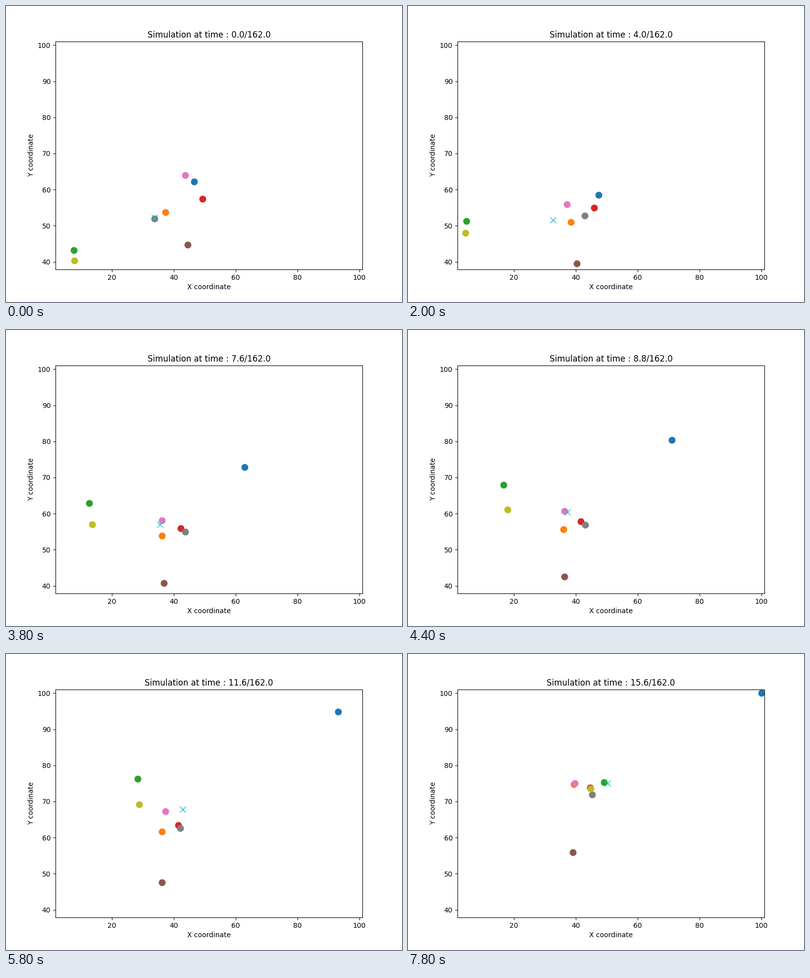
Animation, 800 px wide and 600 px high, one loop 8000 ms. Source, as a matplotlib script:

```python
import numpy as np
import matplotlib.pyplot as plt
from matplotlib.animation import FuncAnimation

FRAMES, INTERVAL, STEP, TOTAL = 40, 200, 0.4, 162.0
LIMIT = 100  # agents stop at the edge of the world

# Each agent steers smoothly through a few waypoints at these times.
TIMES = np.array([0, 2, 5.6, 11.6, 15.6])
AGENTS = {
    "C0": [(46.6, 62.2), (44.6, 56.8), (52.7, 63.2), (93.2, 94.8), (130.9, 100.5)],
    "C1": [(37.3, 53.8), (39.5, 51.4), (37.1, 51.8), (36.3, 61.7), (39.4, 74.8)],
    "C2": [(7.7, 43.2), (3.8, 46.7), (7.5, 55.6), (28.4, 76.3), (49.2, 75.3)],
    "C3": [(49.4, 57.4), (48.5, 56.4), (43.9, 54.4), (41.5, 63.4), (44.7, 73.8)],
    "C5": [(44.6, 44.7), (43.0, 41.3), (38.4, 39.2), (36.3, 47.6), (39.1, 55.9)],
    "C6": [(43.8, 64.0), (39.1, 58.4), (36.6, 55.8), (37.3, 67.2), (39.8, 75.1)],
    "C7": [(33.8, 51.9), (40.1, 53.2), (43.9, 52.8), (42.2, 62.6), (45.3, 71.9)],
    "C8": [(7.9, 40.3), (2.8, 44.6), (8.1, 51.1), (28.8, 69.2), (44.8, 73.5)],
}
points = np.array(list(AGENTS.values())).swapaxes(0, 1)
speeds = np.gradient(points, TIMES, axis=0, edge_order=2)


def positions(t):
    """Positions of all agents: cubic Hermite between waypoints."""
    k = min(np.searchsorted(TIMES, t, side="right"), len(TIMES) - 1) - 1
    span = TIMES[k + 1] - TIMES[k]
    u = (t - TIMES[k]) / span
    ease = u * u * (3 - 2 * u)
    pos = points[k] + ease * (points[k + 1] - points[k])
    pos += span * u * (1 - u) * ((1 - u) * speeds[k] - u * speeds[k + 1])
    return np.minimum(pos, LIMIT)


fig, ax = plt.subplots(figsize=(8, 6), dpi=100)
ax.set_xlim(1.84, 101)
ax.set_ylim(37.9, 101)
ax.set_xlabel("X coordinate")
ax.set_ylabel("Y coordinate")
title = ax.set_title("")

dots = [ax.plot([], [], "o", ms=9, color=c)[0] for c in AGENTS]
cross, = ax.plot([], [], "x", ms=9, color="C9")


def draw(i):
    t = i * STEP
    pos = positions(t)
    for dot, (x, y) in zip(dots, pos):
        dot.set_data([x], [y])
    x, y = pos.mean(axis=0)
    cross.set_data([x], [y])
    title.set_text(f"Simulation at time : {t:.1f}/{TOTAL}")
    return [*dots, cross, title]


anim = FuncAnimation(fig, draw, frames=FRAMES, interval=INTERVAL,
                     repeat=True, repeat_delay=0)
plt.show()
```
